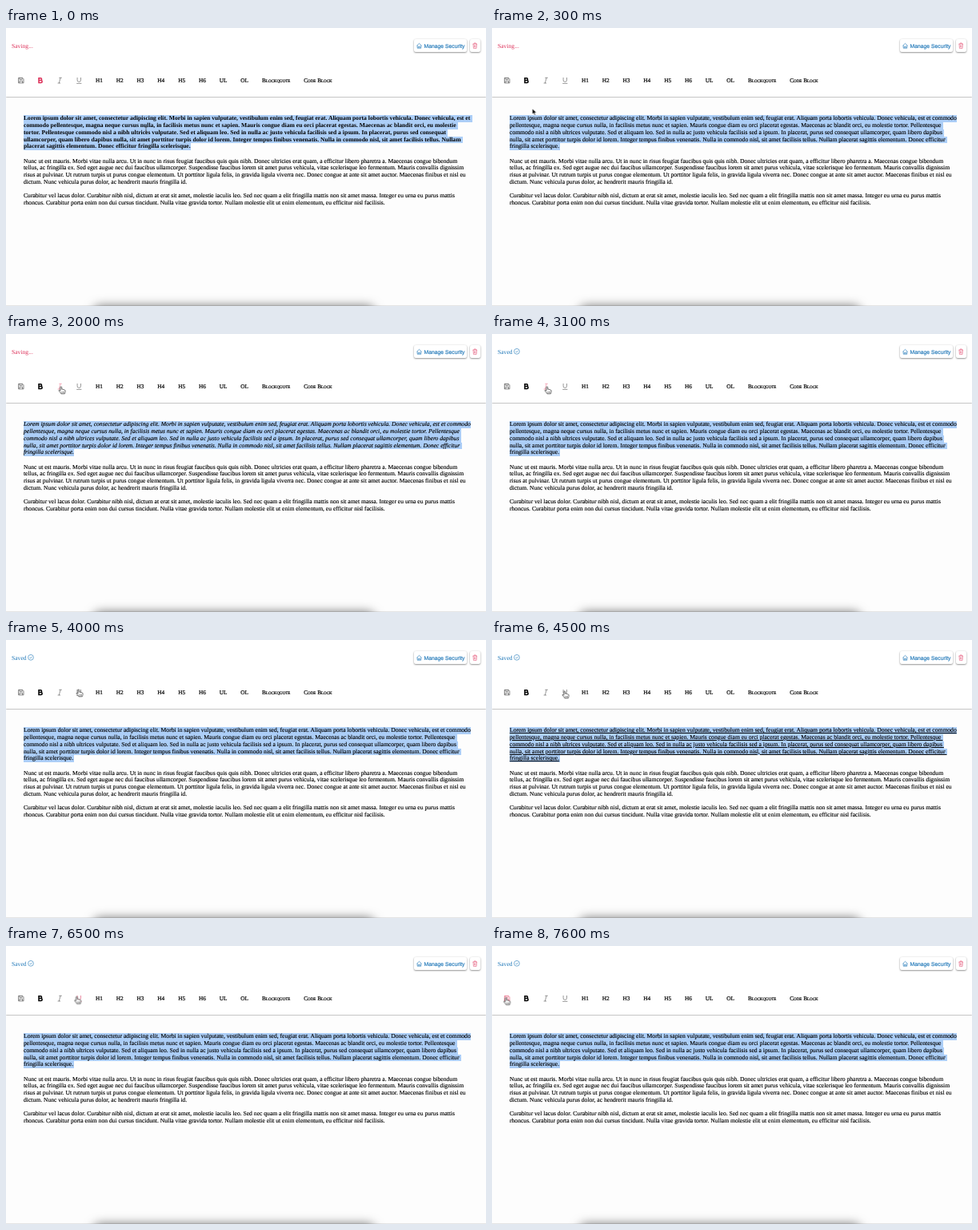
Write an HTML page that moves like this. It is 600x348 px and loops after 8000 ms.

```html
<!DOCTYPE html>
<html lang="en">
<head>
<meta charset="utf-8">
<title>Editor toolbar</title>
<style>
  html, body { margin: 0; width: 100%; height: 100%; overflow: hidden; background: #fdfdfd; }
  #stage {
    position: relative; width: 600px; height: 348px; overflow: hidden;
    font: 7.615px/8.78px "Liberation Serif", Times, serif; color: #000;
    text-rendering: geometricPrecision;
    --pink: #dc2f58; --blue: #1f77b8;
  }
  .bar { position: absolute; inset: 0 0 auto; height: 86px; background: #fff; box-shadow: 0 .5px 1.5px rgba(0, 0, 0, .55); }
  .dock { position: absolute; left: 112px; top: 351px; width: 346px; height: 20px; border-radius: 6px; box-shadow: 0 0 13px 3px rgba(0, 0, 0, .55); }
  .edge { position: absolute; left: 0; top: 347px; width: 600px; height: 1px; background: #e4e4e4; }
  .button { position: absolute; top: 14px; height: 16px; background: #fff; border-radius: 2px; box-shadow: 0 .7px 2px rgba(0, 0, 0, .5); }
  svg { position: absolute; inset: 0; }

  .text { position: absolute; left: 22px; -webkit-text-stroke: .14px #000; }
  .text div { width: fit-content; white-space: pre; }
  .picked div { background: #accef7; padding-right: .5px; }

  .icon { fill: none; stroke: currentColor; }
  .label { font-size: 7.3px; text-anchor: middle; stroke: #000; stroke-width: .2; }
  .caps { font-variant: small-caps; text-anchor: start; }
  .pink { color: var(--pink); fill: var(--pink); }
  .blue { color: var(--blue); fill: var(--blue); }

  /* 1.25% is one 100 ms step */
  .anim { animation: 8s step-end -10ms infinite; }
  .bold { font-weight: bold; -webkit-text-stroke: 0; animation-name: bold; }
  .plain { animation-name: plain, format; }
  .saving { animation-name: saving; }
  .saved { animation-name: saved; }
  .b { animation-name: hoverB; }
  .i { animation-name: hoverI; }
  .u { animation-name: hoverU; }
  .s { animation-name: hoverS; }
  .beam { animation-name: beam; }
  .arrow { animation-name: arrow; }
  .hand { animation-name: hand; }
  .cursor { animation-name: move; }

  @keyframes bold { 0% { visibility: visible } 1.25%, 100% { visibility: hidden } }
  @keyframes plain { 0% { visibility: hidden } 1.25%, 100% { visibility: visible } }
  @keyframes format {
    0%, 36.25%, 71.25%, 100% { font-style: normal; text-decoration-line: none }
    25% { font-style: italic; text-decoration-line: none }
    56.25% { font-style: normal; text-decoration-line: underline }
  }
  @keyframes saving { 0% { visibility: visible } 26.25%, 100% { visibility: hidden } }
  @keyframes saved { 0% { visibility: hidden } 26.25%, 100% { visibility: visible } }

  @keyframes hoverB { 0%, 87.5% { color: #dc2f58 } 1.25%, 88.75%, 100% { color: #000 } }
  @keyframes hoverI { 0%, 46.25%, 87.5%, 100% { color: #555 } 16.25%, 85% { color: #f07f96 } }
  @keyframes hoverU { 0%, 83.75%, 100% { color: #555 } 75% { color: #e04468 } }
  @keyframes hoverS { 0% { color: #444 } 92.5%, 100% { color: #e85a78 } }

  @keyframes beam { 0% { visibility: visible } 3.75%, 100% { visibility: hidden } }
  @keyframes arrow { 0%, 15%, 100% { visibility: hidden } 3.75% { visibility: visible } }
  @keyframes hand { 0% { visibility: hidden } 15%, 100% { visibility: visible } }
  @keyframes move {
    0% { transform: translate(175px, 128px); animation-timing-function: steps(3) }
    3.75% { transform: translate(50.5px, 101px) }
    8.75% { transform: translate(50.5px, 101px); animation-timing-function: steps(4) }
    13.75% { transform: translate(57px, 88px); animation-timing-function: steps(2) }
    16.25% { transform: translate(67px, 70px) }
    17.5% { transform: translate(68.8px, 66px) }
    43.75% { transform: translate(68.8px, 66px); animation-timing-function: steps(5) }
    50% { transform: translate(90.7px, 62px); animation-timing-function: steps(5) }
    56.25% { transform: translate(90.7px, 64px) }
    73.75% { transform: translate(90.7px, 64px); animation-timing-function: steps(2) }
    76.25% { transform: translate(88.5px, 63.5px) }
    81.25% { transform: translate(88.5px, 63.5px); animation-timing-function: steps(3) }
    85% { transform: translate(75px, 64px); animation-timing-function: steps(3) }
    88.75% { transform: translate(30px, 64.5px); animation-timing-function: steps(2) }
    91.25%, 100% { transform: translate(17.5px, 64.7px) }
  }
</style>
</head>
<body>
<div id="stage">
  <div class="bar"></div>
  <div class="button" style="left:510px;width:66px"></div>
  <div class="button" style="left:580px;width:12.5px"></div>
  <div class="edge"></div>
  <div class="dock"></div>

  <div class="text picked bold anim" style="top:109.2px">
    <div>Lorem ipsum dolor sit amet, consectetur adipiscing elit. Morbi in sapien vulputate, vestibulum enim sed, feugiat erat. Aliquam porta lobortis vehicula. Donec vehicula, est et </div>
    <div>commodo pellentesque, magna neque cursus nulla, in facilisis metus nunc et sapien. Mauris congue diam eu orci placerat egestas. Maecenas ac blandit orci, eu molestie </div>
    <div>tortor. Pellentesque commodo nisl a nibh ultrices vulputate. Sed et aliquam leo. Sed in nulla ac justo vehicula facilisis sed a ipsum. In placerat, purus sed consequat </div>
    <div>ullamcorper, quam libero dapibus nulla, sit amet porttitor turpis dolor id lorem. Integer tempus finibus venenatis. Nulla in commodo nisl, sit amet facilisis tellus. Nullam </div>
    <div>placerat sagittis elementum. Donec efficitur fringilla scelerisque.</div>
  </div>
  <div class="text picked plain anim" style="top:109.2px">
    <div>Lorem ipsum dolor sit amet, consectetur adipiscing elit. Morbi in sapien vulputate, vestibulum enim sed, feugiat erat. Aliquam porta lobortis vehicula. Donec vehicula, est et commodo</div>
    <div>pellentesque, magna neque cursus nulla, in facilisis metus nunc et sapien. Mauris congue diam eu orci placerat egestas. Maecenas ac blandit orci, eu molestie tortor. Pellentesque </div>
    <div>commodo nisl a nibh ultrices vulputate. Sed et aliquam leo. Sed in nulla ac justo vehicula facilisis sed a ipsum. In placerat, purus sed consequat ullamcorper, quam libero dapibus </div>
    <div>nulla, sit amet porttitor turpis dolor id lorem. Integer tempus finibus venenatis. Nulla in commodo nisl, sit amet facilisis tellus. Nullam placerat sagittis elementum. Donec efficitur </div>
    <div>fringilla scelerisque.</div>
  </div>
  <div class="text" style="top:162.5px">
    <div>Nunc ut est mauris. Morbi vitae nulla arcu. Ut in nunc in risus feugiat faucibus quis quis nibh. Donec ultricies erat quam, a efficitur libero pharetra a. Maecenas congue bibendum</div>
    <div>tellus, ac fringilla ex. Sed eget augue nec dui faucibus ullamcorper. Suspendisse faucibus lorem sit amet purus vehicula, vitae scelerisque leo fermentum. Mauris convallis dignissim</div>
    <div>risus at pulvinar. Ut rutrum turpis ut purus congue elementum. Ut porttitor ligula felis, in gravida ligula viverra nec. Donec congue at ante sit amet auctor. Maecenas finibus et nisl eu</div>
    <div>dictum. Nunc vehicula purus dolor, ac hendrerit mauris fringilla id.</div>
  </div>
  <div class="text" style="top:206.4px">
    <div>Curabitur vel lacus dolor. Curabitur nibh nisl, dictum at erat sit amet, molestie iaculis leo. Sed nec quam a elit fringilla mattis non sit amet massa. Integer eu urna eu purus mattis</div>
    <div>rhoncus. Curabitur porta enim non dui cursus tincidunt. Nulla vitae gravida tortor. Nullam molestie elit ut enim elementum, eu efficitur nisl facilisis.</div>
  </div>

  <svg width="600" height="348" viewBox="0 0 600 348">
    <text class="saving pink anim" x="7" y="25">Saving...</text>
    <g class="saved blue anim">
      <text x="7" y="25">Saved</text>
      <g class="icon" stroke-width=".6">
        <circle cx="31" cy="21.8" r="3.4"/>
        <path d="M29.5 21.8l1.2 1.2 1.9-2.2"/>
      </g>
    </g>

    <g class="blue">
      <path class="icon" stroke-width=".65" d="M513.5 22.2l3-2.9 3 2.9M514.2 21.6v3.6h4.6v-3.6M515.7 25v-1.9h1.6V25"/>
      <text x="522.5" y="24.7" font-size="6.8" font-family="'Liberation Sans', Arial, sans-serif" stroke="currentColor" stroke-width=".15">Manage Security</text>
    </g>
    <path class="icon pink" style="fill:none" stroke-width=".5" d="M583.4 20h5.6M585.1 20v-1.1h2.2V20M584 20l.4 5.4h3.6l.4-5.4M585.5 21.4v2.8M586.9 21.4v2.8"/>

    <path class="icon s anim" stroke-width=".65" d="M15.6 62.4h5l1.4 1.4v5h-6.4zM17 62.4v2h3.2v-2M16.9 68.8v-2.5h3.7v2.5"/>
    <path class="icon b anim" stroke-width="1.5" d="M41 62.8h2.2a1.4 1.4 0 0 1 0 2.8H41zM41 65.6h2.7a1.5 1.5 0 0 1 0 3H41z"/>
    <path class="icon i anim" stroke-width=".6" d="M66.3 62.3H69.8M64.6 69H68.1M68.1 62.3L66.3 69"/>
    <path class="icon u anim" stroke-width=".6" d="M89.1 62v3.2a2.2 2.2 0 0 0 4.4 0V62M88.2 69.4h6.2"/>

    <g class="label">
      <text x="116.4" y="68">H1</text>
      <text x="142.2" y="68">H2</text>
      <text x="168" y="68">H3</text>
      <text x="193.8" y="68">H4</text>
      <text x="219.6" y="68">H5</text>
      <text x="245.4" y="68">H6</text>
      <text x="271.6" y="68">UL</text>
      <text x="298.2" y="68">OL</text>
      <text class="caps" x="320" y="68">Blockquote</text>
      <text class="caps" x="372.2" y="68">Code Block</text>
    </g>

    <g class="cursor anim">
      <path class="beam anim" fill="none" stroke="#444" stroke-width=".7" d="M-1.6-4Q0-4 0-3V3Q0 4-1.6 4M1.6-4Q0-4 0-3M1.6 4Q0 4 0 3M-.9.9h1.8"/>
      <path class="arrow anim" stroke="#fff" stroke-width=".5" d="M0 0V6.8L1.6 5.4 2.7 8 3.9 7.5 2.8 4.9H5Z"/>
      <g class="hand anim" stroke="#222" stroke-width=".7" stroke-linejoin="round">
        <path fill="#fff" d="M-1 5.2V.8A.9.9 0 0 1 .8.8V3.2C1.3 2.8 2.2 2.9 2.4 3.5 3 3.2 3.8 3.5 3.9 4 4.6 3.9 5.2 4.3 5.2 5V6.4C5.2 7.4 4.5 8 4.5 8.8H0C-.3 7.6-1.6 6.6-2.5 5.4-3.1 4.4-2 3.8-1 5.2Z"/>
        <path fill="none" stroke-width=".5" d="M.9 6v1.6M2.2 6v1.6M3.5 6v1.6"/>
      </g>
    </g>
  </svg>
</div>
</body>
</html>
```
